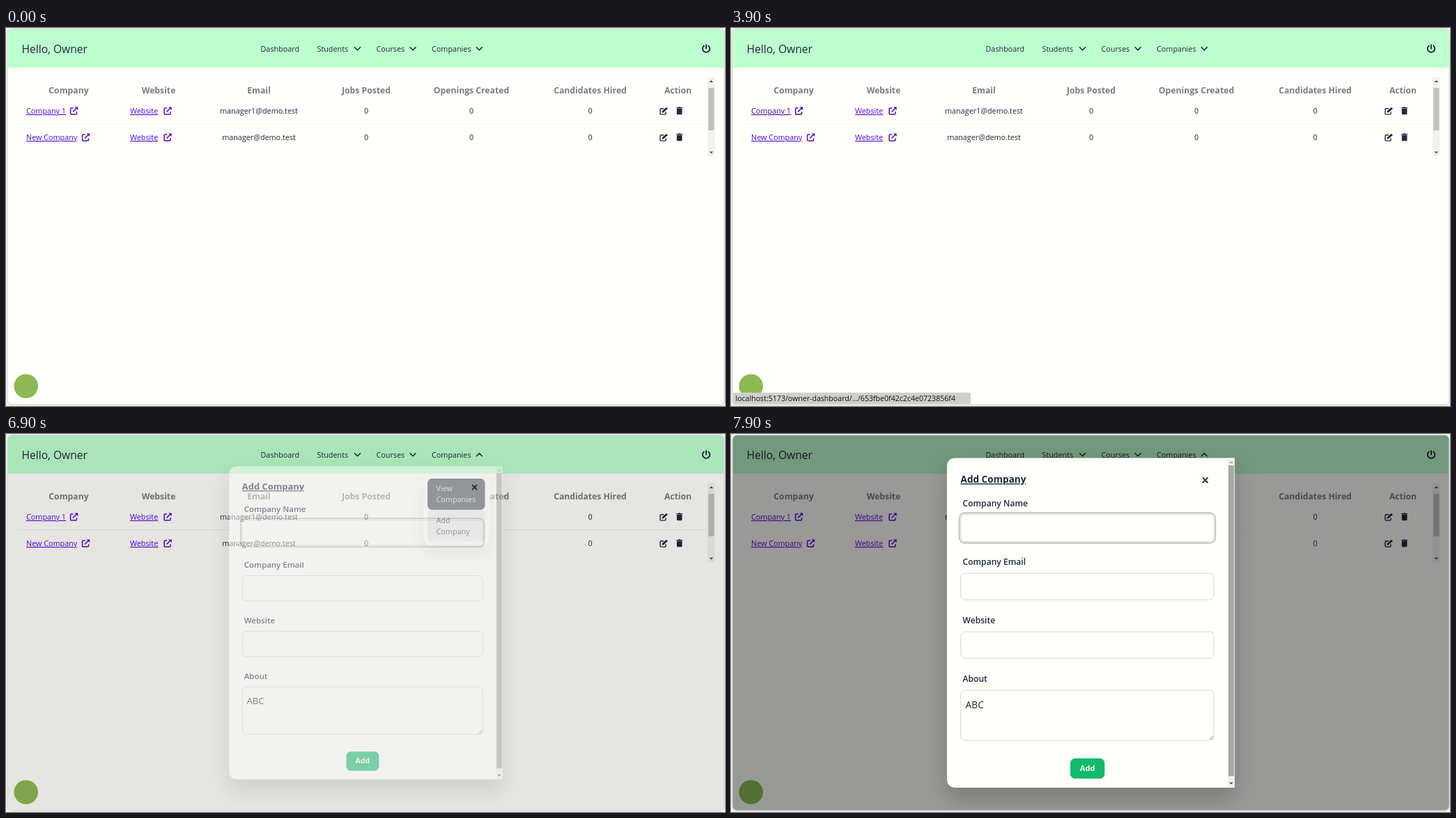
Animation of 1032 by 543 pixels, one loop 8 s. Source, as an HTML page:

```html
<!DOCTYPE html>
<html lang="en">
<head>
<meta charset="utf-8">
<title>Company dashboard</title>
<style>
  html, body { margin: 0; width: 100%; height: 100%; overflow: hidden; background: #f7f7f6; }
  svg { display: block; }
  text { font: 10.8px "Open Sans", "Noto Sans", sans-serif; fill: #1f2937; white-space: pre; }
  .hello { font-size: 15.6px; }
  .head { font-size: 12.2px; font-weight: 700; fill: #797d7f; }
  .link text { text-decoration: underline; text-decoration-thickness: 1px; fill: inherit; }
  .mid { text-anchor: middle; }
  .status { font-size: 10.6px; fill: #111; }
  .title { font-size: 13.6px; font-weight: 700; text-decoration: underline; text-decoration-thickness: 1px; }
  .label { font-size: 12.1px; font-weight: 600; }
  .about { font-size: 13.8px; }
  .add { font-size: 11px; font-weight: 700; fill: #fff; }
  .light { fill: #d7dde4; }
  .line { fill: none; stroke: #1f2937; stroke-width: 1.6; stroke-linecap: round; stroke-linejoin: round; }
  .field { fill: none; stroke: #d6d7d4; }
</style>
</head>
<body>
<svg id="stage" width="1032" height="543" viewBox="0 0 1032 543"></svg>
<script>
const LOOP = 8000;
const PAGE = '#fffffb', INK = '#1f2937', LINK = '#5208e0', LINK_HOVER = '#3807a4';
const PATH_SHORT = 'localhost:5173/owner-dashboard/…/653fbe0f42c2c4e0723856f4';
const PATH_FULL = PATH_SHORT.replace('…', 'company');

const text = (x, y, str, cls = '') => `<text x="${x}" y="${y}" class="${cls}">${str}</text>`;
const rect = (x, y, x2, y2, r, attrs) =>
  `<rect x="${x}" y="${y}" width="${x2 - x}" height="${y2 - y}" rx="${r}" ${attrs}/>`;
const at = (x, y, body, attrs = '') => `<g transform="translate(${x} ${y})" ${attrs}>${body}</g>`;

const chevron = (x, id = '') =>
  at(x, 29.7, `<path ${id && `id="${id}"`} class="line" d="M-4-2L0 2L4-2"/>`);

const arrow = (x, y, dir, fill = '#505050') =>
  `<path d="M${x - 2.8} ${y + dir * 1.4}h5.6l-2.8 ${-dir * 2.8}z" fill="${fill}"/>`;

const openIcon = (x, y) => at(x, y,
  `<path d="M-1-4H-4Q-4.9-4-4.9-3V4Q-4.9 5-4 5H3Q4 5 4 4V1.2M-1.4 1.4L4-4" fill="none" stroke="currentColor" stroke-width="1.5"/>
   <path d="M1-5.6H5.7V-.9z" fill="currentColor"/>`);

const editIcon = (x, y) => at(x, y,
  `<path class="line" d="M0-3.6H-3.6Q-4.8-3.6-4.8-2.6V3.8Q-4.8 4.8-3.8 4.8H2.2Q3.2 4.8 3.2 3.8V1.6" style="stroke-width:1.4"/>
   <path d="M-2.3 2.4L-1.9 0L3.6-5Q4.2-5.5 4.8-4.9L5.5-4.2Q6-3.6 5.5-3L0 2z" fill="${INK}"/>`);

const trashIcon = (x, y) => at(x, y,
  `<path d="M-4.3-4.7H-1.6L-1-5.5H1L1.6-4.7H4.3V-3.4H-4.3zM-3.8-2.8H3.8V4.3Q3.8 5.5 2.6 5.5H-2.6Q-3.8 5.5-3.8 4.3z" fill="${INK}"/>`);

const link = (id, x, y, str, iconX) =>
  `<g id="${id}" class="link">${text(x, y, str)}${openIcon(iconX, y - 4)}</g>`;

function row(n, y, name, iconX, mail) {
  return link('name' + n, 29, y, name, iconX) + link('site' + n, 178, y, 'Website', 232) +
    text(363, y, mail, 'mid') + [517, 668, 838.5].map(x => text(x, y, 0, 'mid')).join('') +
    editIcon(943.8, y - 3.7) + trashIcon(966.6, y - 4.2);
}

const heads = [[90, 'Company'], [219, 'Website'], [363, 'Email'], [517, 'Jobs Posted'],
  [668, 'Openings Created'], [838.5, 'Candidates Hired'], [964.5, 'Action']];

const page =
  rect(2.5, 2, 1030.5, 540.5, 6, `fill="${PAGE}" style="filter:drop-shadow(0 0 1.5px #0005)"`) +
  '<path d="M2.5 57V8Q2.5 2 8.5 2H1024.5Q1030.5 2 1030.5 8V57z" fill="#bdffce"/>' +
  text(22.5, 35.5, 'Hello, Owner', 'hello') +
  rect(599, 15, 694, 44.5, 6.5, 'id="navHover" fill="#1f2937" fill-opacity=".17"') +
  text(365.5, 33.5, 'Dashboard') + text(446.5, 33.5, 'Students') +
  text(531.5, 33.5, 'Courses') + text(611, 33.5, 'Companies') +
  chevron(504.5) + chevron(584) + chevron(679.3, 'chev') +
  at(1005, 29.5, '<path class="line" d="M-3.2-3.9A5.2 5.2 0 1 0 3.2-3.9M0-5.4V0" style="stroke-width:1.9"/>') +
  heads.map(([x, s]) => text(x, 94, s, 'head mid')).join('') +
  row(1, 123, 'Company 1', 97.5, 'manager1@demo.test') +
  '<path d="M16 137.5H1007" stroke="#f2f2ee"/>' +
  row(2, 161, 'New Company', 114.5, 'manager@demo.test') +
  rect(1007, 70.5, 1017.5, 184.5, 0, 'fill="#f1f1f1"') +
  rect(1008.2, 86, 1016.4, 147, 0, 'fill="#c1c1c1"') +
  arrow(1012.3, 76.5, 1) + arrow(1012.3, 179, -1);

const menu = '<g id="menu">' +
  rect(599, 58, 694, 161, 12.8, `fill="${PAGE}" style="filter:drop-shadow(0 12px 10px #0000001c)"`) +
  rect(605, 64, 687.5, 109, 6.5, 'fill="#2a323c"') +
  text(617.5, 82, 'View', 'light') + text(617.5, 98, 'Companies', 'light') +
  rect(605, 109.5, 687.5, 154.5, 6.5, 'id="addHover" fill="#1f2937" fill-opacity=".1"') +
  text(617.5, 128, 'Add') + text(617.5, 144, 'Company') + '</g>';

const badge = '<circle cx="28.7" cy="514.5" r="17.3" fill="#8cb951"/>';

const status = '<svg id="status" x="3" y="523.5" width="341" height="17">' +
  '<path id="bar" fill="#cfcfcb"/>' + text(3.5, 12.5, '', 'status') + '</svg>';

const modal =
  rect(2.5, 2, 1030.5, 540.5, 6, 'id="shade"') +
  '<g id="modal">' +
  `<path d="M723 34.5V508H322.8Q310 508 310 495.2V47.3Q310 34.5 322.8 34.5z" fill="${PAGE}" style="filter:drop-shadow(0 16px 16px #0003)"/>` +
  rect(713, 34.5, 723, 508, 0, 'fill="#f1f1f1"') +
  rect(714, 45, 722, 491.5, 0, 'fill="#a8a8a8"') +
  arrow(718, 40.5, 1, '#a3a3a3') + arrow(718, 502, -1) +
  text(329.5, 70, 'Add Company', 'title') +
  at(680.7, 66.3, '<path class="line" d="M-3.2-3.2L3.2 3.2M3.2-3.2L-3.2 3.2" style="stroke-width:2"/>') +
  ['Company Name', 'Company Email', 'Website', 'About']
    .map((s, i) => text(332.5, 104 + 84 * i, s, 'label')).join('') +
  rect(327.6, 113.4, 695.4, 156.6, 8, 'fill="none" stroke="#b5b8b9" stroke-width="1.6"') +
  [[115.8, 154.4], [200, 238.2], [284, 322.2], [368, 440]]
    .map(([a, b]) => rect(329.8, a, 693, b, 6.4, 'class="field"')).join('') +
  '<path d="M686.5 439L692 433.5M689.5 439L692 436.5" stroke="#777" stroke-width=".9"/>' +
  text(336.5, 394, 'ABC', 'about') +
  rect(487, 466, 536.3, 495, 6.5, 'fill="#12bb6b"') + text(511.6, 484, 'Add', 'add mid') +
  '</g>';

document.getElementById('stage').innerHTML = page + menu + badge + status + modal;

const $ = id => document.getElementById(id);
const statusText = document.querySelector('.status');
const ramp = (t, a, b) => Math.min(1, Math.max(0, (t - a) / (b - a)));
const smooth = x => x * x * (3 - 2 * x);
const within = (t, a, b) => t >= a && t < b;

function paintLink(id, hover) {
  const color = hover ? LINK_HOVER : LINK;
  $(id).style.fill = $(id).style.color = color;
}

function drawStatus(t) {
  const site = t >= 4800;
  const width = site ? 85.5 : 341 + 27 * ramp(t, 4100, 4400);
  statusText.textContent = site ? 'https://abc.com' : t >= 4200 ? PATH_FULL : PATH_SHORT;
  $('status').setAttribute('width', width);
  $('bar').setAttribute('d', `M0 0H${width - 3}Q${width} 0 ${width} 3V17H3Q0 17 0 14z`);
  $('status').style.opacity = ramp(t, 2800, 3100) * (1 - ramp(t, 5000, 5400));
}

function draw(t) {
  paintLink('name1', within(t, 2500, 4700));
  paintLink('name2', within(t, 2300, 2500));
  paintLink('site1', within(t, 4700, 5000));
  paintLink('site2', false);
  drawStatus(t);

  $('navHover').style.opacity = ramp(t, 5200, 5400) * (1 - ramp(t, 6100, 6400));
  $('chev').setAttribute('transform', `rotate(${180 * ramp(t, 5800, 6200)})`);
  $('menu').style.display = t >= 5800 ? '' : 'none';
  $('addHover').style.opacity = ramp(t, 6300, 6500);

  const p = smooth(ramp(t, 6700, 7100));
  $('shade').style.opacity = 0.4 * p * p;
  $('modal').style.opacity = p;
  $('modal').setAttribute('transform',
    `translate(516.5 271.2) scale(${0.9 + 0.1 * p}) translate(-516.5 -271.2)`);
}

// The screen is refreshed ten times a second.
function tick() {
  draw(Math.floor(performance.now() % LOOP / 100) * 100);
  requestAnimationFrame(tick);
}
tick();
</script>
</body>
</html>
```
